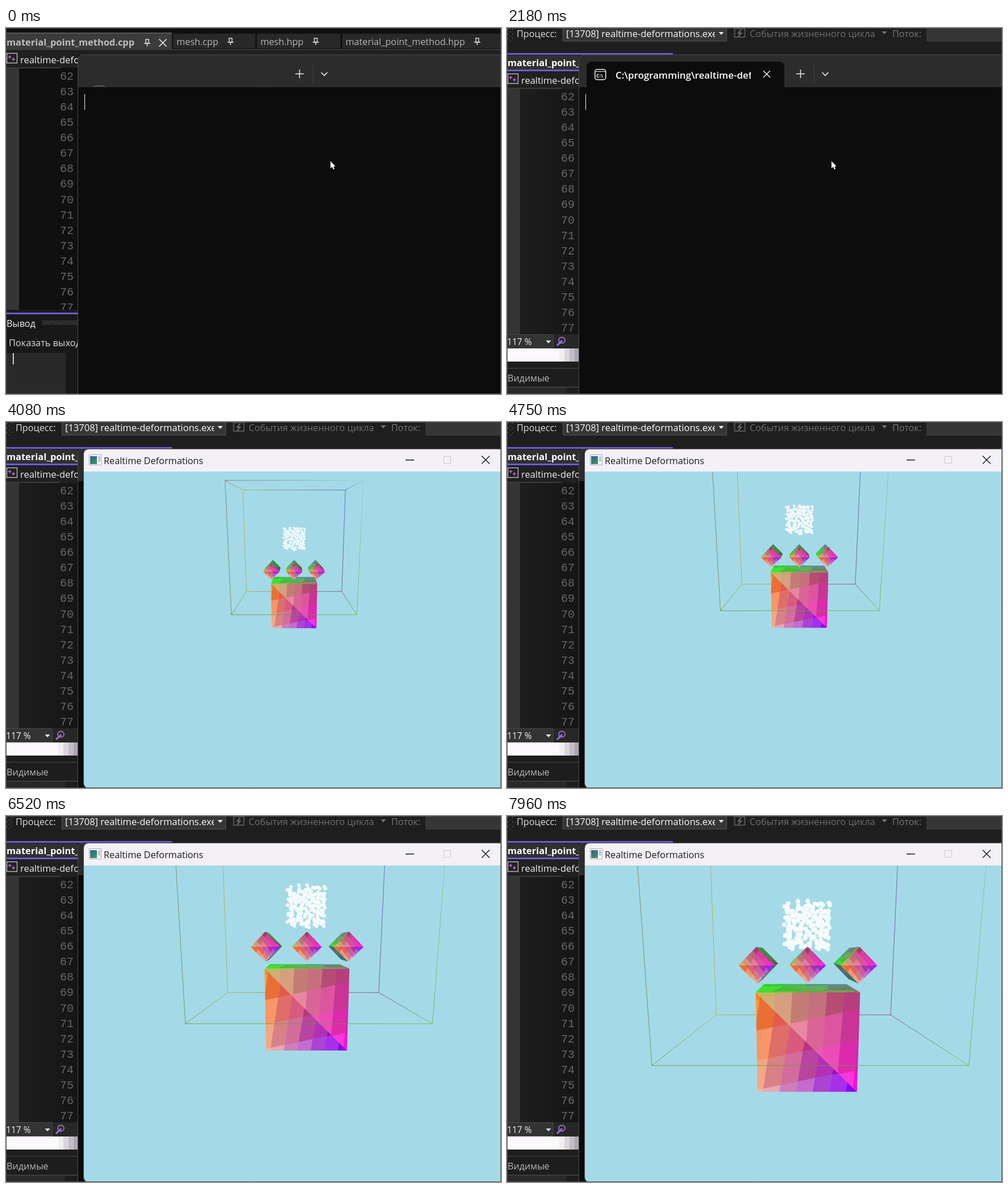
An HTML page with a canvas for the animation above (8000 ms loop, 871x643 px).

```html
<!DOCTYPE html>
<html lang="ru">
<head>
<meta charset="utf-8">
<style>
html, body { margin: 0; width: 100%; height: 100%; overflow: hidden; background: #0c0c0c; }
canvas { display: block; }
</style>
</head>
<body>
<canvas id="stage" width="871" height="643"></canvas>
<script>
const ctx = document.getElementById('stage').getContext('2d');
const UI = '"Open Sans", "Noto Sans", sans-serif';
const MONO = '"Liberation Mono", "DejaVu Sans Mono", monospace';
const PURPLE = '#6c5bd6';

// ---------- drawing helpers ----------
function rect(x, y, w, h, color) {
  ctx.fillStyle = color;
  ctx.fillRect(x, y, w, h);
}
function text(s, x, y, color, size = 16.3, weight = 400, family = UI) {
  ctx.font = `${weight} ${size}px ${family}`;
  ctx.fillStyle = color;
  ctx.fillText(s, x, y);
  return ctx.measureText(s).width;
}
function path(points, closed) {
  ctx.beginPath();
  points.forEach(([x, y]) => ctx.lineTo(x, y));
  if (closed) ctx.closePath();
}
function line(points, color, width = 1) {
  path(points);
  ctx.strokeStyle = color;
  ctx.lineWidth = width;
  ctx.stroke();
}
function fill(points, color) {
  path(points, true);
  ctx.fillStyle = color;
  ctx.fill();
}
function clipped(x, y, w, h, draw, r = 0) {
  ctx.save();
  ctx.beginPath();
  ctx.roundRect(x, y, w, h, r);
  ctx.clip();
  draw();
  ctx.restore();
}
function outline(x, y, w, h, color, width = 1, r = 0) {
  ctx.beginPath();
  ctx.roundRect(x, y, w, h, r);
  ctx.strokeStyle = color;
  ctx.lineWidth = width;
  ctx.stroke();
}
function cross(x, y, r, color, width = 1.5) {
  for (const d of [r, -r]) line([[x - r, y - d], [x + r, y + d]], color, width);
}
function plus(x, y, r, color) {
  line([[x - r, y], [x + r, y]], color, 1.5);
  line([[x, y - r], [x, y + r]], color, 1.5);
}
function dots(x, y, columns, rows, step) {
  for (let c = 0; c < columns; c++)
    for (let r = c % 2; r < rows; r += 2) rect(x + c * step, y + r * step, 1.2, 1.2, '#8a8a8a');
}
const arrow = (x, y, color) => fill([[x - 4.5, y - 2], [x + 4.5, y - 2], [x, y + 3]], color);

function pin(x, y) {
  outline(x - 2, y - 5, 5, 7, '#ddd', 1.5);
  line([[x - 5, y + 2], [x + 6, y + 2]], '#ddd', 1.5);
  line([[x + .5, y + 2], [x + .5, y + 7]], '#ddd', 1.5);
}

// ---------- editor behind the windows ----------
function lineNumbers(top, end) {
  rect(1, top - 13, 22, end - top + 13, '#343434');
  clipped(23, top - 14, 104, end - top + 14, () => {
    for (let i = 0; i < 16; i++)
      text(62 + i, 95, top + 7 + i * 27.07, '#666', 20, 400, MONO);
  });
}
function navigation(y) {
  rect(0, y - 14, 126, 28, '#202020');
  outline(1.5, y - 11.5, 18, 17, '#b8b8b8', 1.4);
  plus(6.5, y - 5, 3, '#b868d8');
  plus(13, y - 1, 3, '#b868d8');
  text('realtime-deformations', 25, y + 6, '#ededed', 16.5);
  rect(1, y + 13, 95, 2, '#3a3a3a');
}
function idleEditor() {
  rect(0, 0, 871, 643, '#101010');
  rect(0, 38, 871, 10, '#1e1e1e');
  rect(1, 9, 291, 29, '#3b3b3b');
  rect(1, 8, 291, 2, '#555');
  text('material_point_method.cpp', 1, 31, '#bebebe', 16.4, 700);
  pin(248, 25);
  cross(276, 26, 6.5, '#e8e8e8', 1.7);
  let x = 294;
  for (const name of ['mesh.cpp', 'mesh.hpp', 'material_point_method.hpp']) {
    rect(x, 10, 871 - x, 26, '#282828');
    const w = text(name, x + 6, 30, '#b4b4b4', 16.2);
    pin(x + w + 27, 23);
    x += w + 74;
    rect(x - 3, 10, 3, 26, '#101010');
  }
  rect(0, 37, 871, 2, '#383838');
  navigation(56);
  lineNumbers(84, 495);
  rect(0, 495, 127, 5, '#1b1b1b');
  rect(1, 500, 126, 3, PURPLE);
  rect(0, 503, 127, 140, '#181818');
  text('Вывод', 1, 525, '#f0f0f0', 16);
  dots(64, 514, 31, 4, 2);
  text('Показать выходные', 5, 559, '#dcdcdc');
  rect(1, 571, 104, 72, '#292929');
  rect(12, 571, 1.5, 20, '#fff');
}
function processBar() {
  dots(1, 2, 3, 6, 4);
  text('Процесс:', 17, 16, '#dcdcdc', 16.2);
  rect(98, 0, 289, 23, '#363636');
  outline(98.5, -1, 288, 24, '#555');
  clipped(100, 0, 266, 23, () => text('[13708] realtime-deformations.exe', 104, 16, '#fafafa', 16.5));
  arrow(377, 9, '#eee');
  outline(400.5, 1, 18, 15, '#555', 2);
  line([[412, 3], [407, 9], [412, 9], [407, 15]], '#6a6a6a', 2);
  text('События жизненного цикла', 427, 16, '#6e6e6e', 16.2);
  arrow(664, 8, '#777');
  text('Поток:', 678, 16, '#767676', 16.2);
  rect(738, 0, 133, 24, '#363636');
}
function debugEditor() {
  rect(0, 0, 871, 643, '#1e1e1e');
  processBar();
  rect(1, 44, 291, 3, PURPLE);
  rect(1, 48, 125, 25, '#303030');
  text('material_point_method.cpp', 1, 67, '#fff', 16.4, 700);
  rect(1, 73, 126, 3, PURPLE);
  navigation(92);
  const shade = ctx.createLinearGradient(30, 0, 127, 0);
  shade.addColorStop(0, '#1d1d1d');
  shade.addColorStop(1, '#151515');
  rect(23, 108, 104, 430, shade);
  lineNumbers(120, 538);
  rect(0, 538, 127, 25, '#272727');
  rect(0, 539, 81, 23, '#333');
  outline(-1, 538.5, 82, 24, '#4a4a4a');
  text('117 %', 0, 557, '#f0f0f0', 15.6);
  arrow(73, 551, '#eee');
  outline(91, 543.5, 11, 10, '#9a72d0', 1.8, 5);
  line([[97, 549], [88, 558]], '#9a72d0', 3);
  rect(0, 563, 127, 23, '#fbf9fc');
  for (let i = 0; i < 4; i++) rect(92 + i * 9, 563, 9, 23, `hsl(280 8% ${94 - i * 9}%)`);
  rect(0, 587, 127, 56, '#1d1d1d');
  rect(0, 597, 127, 1.5, '#3c3c3c');
  text('Видимые', 1, 621, '#b8b8b8', 16.2);
  rect(0, 630, 127, 2, '#3c3c3c');
  rect(0, 632, 104, 11, '#292929');
}

// ---------- console ----------
const ramp = (v, from, to) => Math.min(1, Math.max(0, (v - from) / (to - from)));

function consoleTab(rise) {
  const offset = 29 * (1 - rise) ** 3;
  clipped(127, 48, 744, 56, () => {
    ctx.translate(0, offset);
    if (rise) clipped(140, 59, 348, 60, () => rect(140, 59, 348, 60, '#0c0c0c'), 9);
    outline(154.8, 72.8, 19, 18, rise ? '#f2f2f2' : '#666', 1.5, 4);
    line([[156, 76.5], [173, 76.5]], '#f2f2f2');
    text('C:\\', 157, 87, '#f2f2f2', 9, 700);
    clipped(191, 60, 238, 44, () =>
      text('C:\\programming\\realtime-deformations', 191, 88.5, '#fff', 16.9, 600));
    cross(457, 81, 6, '#eee');
  });
}
function consoleWindow(t) {
  clipped(126, 47, 760, 620, () => {
    rect(126, 47, 745, 57, '#2c2c2c');
    rect(126, 104, 745, 539, '#0c0c0c');
  }, 9);
  outline(126.5, 47, 760, 620, '#4c4c4c', 1, 9);
  consoleTab(ramp(t, 110, 510));
  plus(516.5, 80.5, 7.5, '#eee');
  rect(540, 65, 1, 32, '#444');
  line([[554.5, 78], [560, 83.5], [565.5, 78]], '#eee', 1.6);
  if (t < 1630 || t >= 2180) rect(138, 116, 1, 28, '#f2f2f2');
}
function pointer(x, y) {
  fill([[x, y], [x, y + 12.5], [x + 3, y + 10], [x + 8.5, y + 8.8]], '#fff');
  line([[x + 3, y + 7], [x + 6, y + 14]], '#fff', 2.2);
}

// ---------- 3D scene ----------
const FOCAL = 670, CENTER_X = 507, CENTER_Y = 365.5, TILT = .2862;
let cam;

// Fly along the view axis, look up, then approach a little more
function cameraAt(step) {
  const travel = 1.98 * ramp(step, 3.6, 19.7), approach = ramp(step, 28, 36);
  const pitch = TILT - .078 * ramp(step, 21, 26) - .024 * approach;
  return {
    dist: 3.488 - travel - .351 * approach,
    height: .9 - travel * Math.tan(TILT) + .031 * approach,
    shift: .06 * ramp(step, 8, 18) - .012 * approach,
    cos: Math.cos(pitch),
    sin: Math.sin(pitch)
  };
}
function project([x, y, z]) {
  const dy = y - cam.height, dz = z + cam.dist;
  const s = FOCAL / (dz * cam.cos - dy * cam.sin);
  return [CENTER_X + s * (x + cam.shift), CENTER_Y - s * (dy * cam.cos + dz * cam.sin), s];
}

// Colours are linear over each half of the front, split along a diagonal
function frontColor(u, v, lower) {
  return lower
    ? [255 - 96 * u - 19 * v, 125 - 165 * u + 50 * v, 25 + 100 * u + 125 * v]
    : [205 - 27 * u + 72 * v, 200 - 150 * u - 25 * v, 105 + 15 * u + 95 * v];
}
function sideColor(side) {
  return (u, v) => {
    const blue = side ? side * .25 : u * (1 - v * .7), light = side ? .75 : 1;
    return [40 + 60 * u + 30 * v, 225 - 100 * Math.max(u, blue), 40 + 135 * blue].map(c => c * light);
  };
}

function face([a, b, c, d], colorAt, strips) {
  const at = (u, v) => project(a.map((p, i) =>
    p * (1 - u) * (1 - v) + b[i] * u * (1 - v) + c[i] * u * v + d[i] * (1 - u) * v));
  const [A, B, C, D] = [a, b, c, d].map(project);
  const facing = (B[0] - A[0]) * (C[1] - A[1]) - (B[1] - A[1]) * (C[0] - A[0]);
  if (facing <= 0) return;
  for (const lower of [false, true]) {
    ctx.save();
    path(lower ? [A, D, C] : [A, B, C], true);
    ctx.clip();
    const lean = lower ? -.16 : -.06;
    const corner = (p, q) => {
      const u = p / strips, v = q / 3.2 - .22 * (u - .3);
      return [u + lean * (v - .3), v];
    };
    for (let i = -1; i <= strips + 1; i++) for (let j = -1; j < 5; j++) {
      const tone = ((i * 2 + j * 3 + 8) % 4 - 1.5) * 5;
      const rgb = colorAt(...corner(i + .5, j + .5), lower).map(n => Math.round(n + tone));
      path([[i, j], [i + 1, j], [i + 1, j + 1], [i, j + 1]].map(p => at(...corner(...p))), true);
      ctx.fillStyle = ctx.strokeStyle = `rgb(${rgb})`;
      ctx.lineWidth = .7;
      ctx.fill();
      ctx.stroke();
    }
    ctx.restore();
  }
}
// Square prism; turn is the angle of its first corner
function prism(x, y, z, radius, depth, turn, strips) {
  const ring = dz => [0, 1, 2, 3].map(i => {
    const a = turn - i * Math.PI / 2;
    return [x + radius * Math.cos(a), y + radius * Math.sin(a), z + dz];
  });
  const near = ring(0), far = ring(depth);
  for (let i = 0; i < 4; i++) {
    const n = (i + 1) % 4;
    face([far[i], far[n], near[n], near[i]], sideColor(i), 4);
  }
  face(near, frontColor, strips);
}

// Corner bits: 1 right, 2 top, 4 back
const CORNER_COLORS = ['#68862f', '#58bd2c', '#75707c', '#98cdd2', '#a5ad35', '#7d3577', '#c39a48', '#4a55bb'];
const corner3d = i => project([(i & 1) - .5, (i & 2) / 2, (i & 4) / 4]);

function edges(front, plain) {
  ctx.globalAlpha = .85;
  for (const bit of [1, 2, 4]) for (let i = 0; i < 8; i++) {
    if (i & bit || front !== !((i | bit) & 4)) continue;
    const a = corner3d(i), b = corner3d(i | bit);
    const g = ctx.createLinearGradient(a[0], a[1], b[0], b[1]);
    g.addColorStop(0, CORNER_COLORS[i]);
    g.addColorStop(1, CORNER_COLORS[i | bit]);
    line([a, b], plain ? '#10181a' : g, .9);
  }
  ctx.globalAlpha = 1;
}

let seed = 7;
const random = () => (seed = seed * 16807 % 2147483647) / 2147483647;
const scatter = cell => ((cell % 6 + random()) / 6 - .5) * .19;
const CLOUD = Array.from({ length: 216 }, (_, i) =>
  [scatter(i), scatter(Math.floor(i / 6)), .47 - scatter(Math.floor(i / 36))]);

function cloud(step) {
  const height = .597 - .004 * step;
  ctx.lineWidth = .5;
  ctx.strokeStyle = 'rgba(165,218,232,.6)';
  ctx.fillStyle = step < 3 ? '#e9f1f6' : '#fff';
  for (const [x, y, z] of CLOUD) {
    const [px, py, s] = project([x, y + height, z]);
    ctx.beginPath();
    ctx.arc(px, py, .0092 * s, 0, 7);
    ctx.fill();
    ctx.stroke();
  }
}
function scene(step) {
  cam = cameraAt(step);
  const plain = step < 2;
  edges(false, plain);
  cloud(step);
  prism(0, .007, .27, .196 * Math.SQRT2, .392, Math.PI * .75, 6);
  for (const side of [-1, 1, 0]) prism(side * .194, .302, .3, .0685, .28, Math.PI, 5);
  edges(true, plain);
}
function appWindow(t, step) {
  ctx.save();
  if (t < 2860) ctx.globalAlpha = .6;
  clipped(137, 48, 750, 595, () => {
    rect(137, 48, 734, 39, '#f3f0f6');
    rect(137, 87, 734, 556, '#a4dae7');
    if (step >= 0) clipped(137, 87, 734, 556, () => scene(step));
  }, 8);
  outline(136.5, 47.5, 750, 596, '#4a4a4a', 1, 8);
  rect(147, 58, 21, 18, '#fafafa');
  outline(146.5, 57.5, 21, 18, '#a8a8b0');
  const g = ctx.createLinearGradient(148, 59, 160, 74);
  g.addColorStop(0, '#2f5f9a');
  g.addColorStop(1, '#3f9a5a');
  rect(148, 60, 12, 14, g);
  rect(162, 60, 4, 10, '#c5c9cc');
  text('Realtime Deformations', 172, 74, '#1b1b1b', 16.25);
  rect(703, 66, 15, 1.5, '#1b1b1b');
  outline(770.5, 60.5, 12, 12, '#c9c6cc');
  cross(844, 66.5, 7, '#1b1b1b');
  ctx.restore();
}

// ---------- timeline ----------
function draw(t) {
  const step = Math.floor((t - 2950) / 136.2);
  if (t < 620) idleEditor(); else debugEditor();
  consoleWindow(t);
  if (t < 2740) pointer(571, 234);
  else appWindow(t, step);
  outline(.5, .5, 870, 642, '#4e4e4e');
}
const start = performance.now();
function tick() {
  draw((performance.now() - start) % 8000);
  requestAnimationFrame(tick);
}
tick();
</script>
</body>
</html>
```
